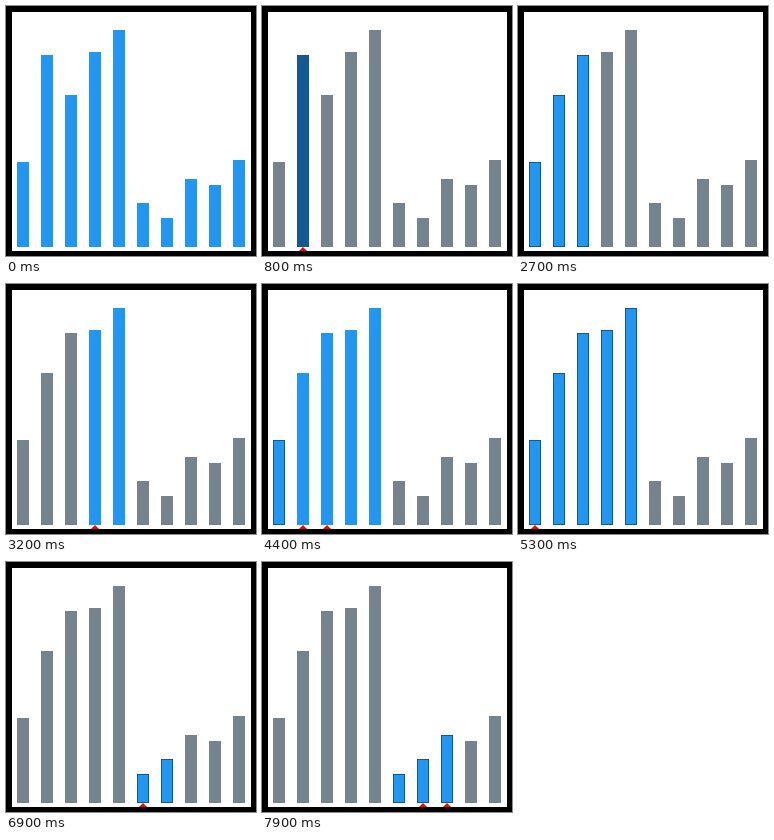
An HTML page with a canvas for the animation above (8000 ms loop, 250 by 250 pixels).

```html
<!DOCTYPE html>
<html lang="en">
<head>
<meta charset="utf-8">
<title>Merge sort</title>
<style>
html, body { margin: 0; width: 100%; height: 100%; overflow: hidden; background: #000; }
canvas { display: block; }
</style>
</head>
<body>
<canvas id="stage" width="250" height="250"></canvas>
<script>
const ctx = document.getElementById('stage').getContext('2d');
const BLUE = '#2196f3', GRAY = '#75838d', DARK = '#135a94', RED = '#ff0000';
const BASE = 241, STEP_MS = 100, LOOP_MS = 8000;

const bars = [85, 192, 152, 195, 217, 44, 29, 68, 62, 87];
const steps = [];

function record(lo, hi, marks = [], edged = lo, solid = false) {
  steps.push({ heights: bars.slice(), lo, hi, marks, edged, solid });
}

function merge(lo, mid, hi) {
  const out = [];
  let i = lo, j = mid + 1;
  record(lo, hi, [lo]);

  while (i <= mid && j <= hi) {
    const k = lo + out.length;
    record(lo, hi, [k], k);
    record(lo, hi, [k, mid], k);
    out.push(bars[i] <= bars[j] ? bars[i++] : bars[j++]);
  }
  while (i <= mid || j <= hi) {
    const k = lo + out.length;
    record(lo, hi, [k], k);
    record(lo, hi, [k, mid], k);
    record(lo, hi, [k, mid], k + 1);
    out.push(i <= mid ? bars[i++] : bars[j++]);
  }

  out.forEach((h, n) => { bars[lo + n] = h; });
  record(lo, hi, [lo], hi + 1);
  record(lo, hi, [], hi + 1);
}

function sort(lo, hi) {
  if (lo === hi) {
    record(lo, hi, [lo], lo, true);
    return;
  }
  const mid = (lo + hi) >> 1;
  record(lo, hi, [mid]);
  record(lo, hi);
  sort(lo, mid);
  sort(mid + 1, hi);
  merge(lo, mid, hi);
}

function drawMark(i) {
  const x = 17 + 24 * i;
  ctx.fillStyle = RED;
  ctx.beginPath();
  ctx.moveTo(x, BASE);
  ctx.lineTo(x + 4, 245);
  ctx.lineTo(x - 4, 245);
  ctx.fill();
}

function drawStep(s) {
  ctx.fillStyle = '#000';
  ctx.fillRect(0, 0, 250, 250);
  ctx.fillStyle = '#fff';
  ctx.fillRect(6, 6, 239, 239);

  s.heights.forEach((h, i) => {
    const x = 11 + 24 * i, y = BASE - h;
    const active = i >= s.lo && i <= s.hi;
    ctx.fillStyle = !active ? GRAY : s.solid ? DARK : BLUE;
    ctx.fillRect(x, y, 12, h);
    if (active && i < s.edged) {
      ctx.strokeStyle = DARK;
      ctx.lineWidth = 1;
      ctx.strokeRect(x + 0.5, y + 0.5, 11, h - 1);
    }
  });
  s.marks.forEach(drawMark);
}

sort(0, bars.length - 1);
steps.shift(); // the loop opens on the plain full range

function tick() {
  const t = performance.now() % LOOP_MS;
  drawStep(steps[Math.floor(t / STEP_MS)]);
  requestAnimationFrame(tick);
}
drawStep(steps[0]);
requestAnimationFrame(tick);
</script>
</body>
</html>
```
